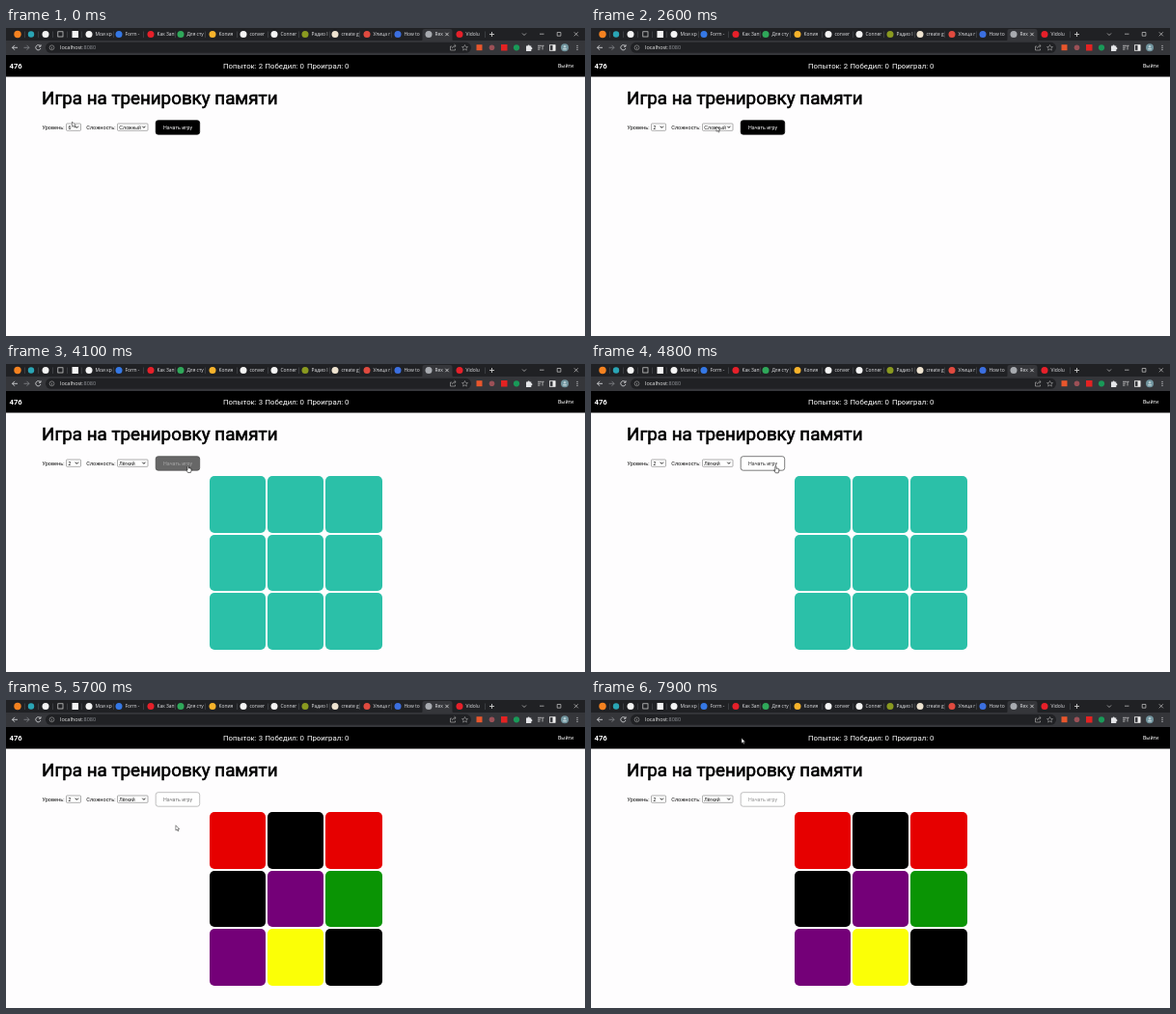
Recreate the animation shown at these times as an HTML page. Size 600 by 319 pixels, loop 8 s.

```html
<!DOCTYPE html>
<html lang="ru">
<head>
<meta charset="utf-8">
<style>
html, body { margin: 0; width: 100%; height: 100%; overflow: hidden; background: #fefdfe; }
svg { position: absolute; left: 0; top: 0; }
text { font-family: Roboto, sans-serif; white-space: pre; }
.ui { font-family: "Open Sans", sans-serif; }
.field { font-family: "Liberation Sans", Arial, sans-serif; }
.card { position: absolute; width: 58.5px; height: 58.5px; border-radius: 5px; }
</style>
</head>
<body>
<svg id="page" width="600" height="319"></svg>
<div id="grid"></div>
<svg id="top" width="600" height="319"></svg>
<script>
const $ = id => document.getElementById(id);
const rect = (x, y, w, h, fill, more = '') =>
  `<rect x="${x}" y="${y}" width="${w}" height="${h}" fill="${fill}" ${more}/>`;
const dot = (x, y, r, fill, more = '') =>
  `<circle cx="${x}" cy="${y}" r="${r}" fill="${fill}" ${more}/>`;
const label = (x, y, size, fill, str, more = '') =>
  `<text x="${x}" y="${y}" font-size="${size}" fill="${fill}" ${more}>${str}</text>`;
const line = (d, color, w = 0.8) =>
  `<path d="${d}" fill="none" stroke="${color}" stroke-width="${w}"/>`;

function tabBar() {
  let s = rect(0, 0, 600, 14, '#202124');
  s += '<path d="M429 14q2.5 0 2.5-2.5V3.5q0-2.5 2.5-2.5h26q2.5 0 2.5 2.5v8q0 2.5 2.5 2.5z" fill="#35363a"/>';
  s += dot(12, 6.5, 3.7, '#f58220') + dot(26, 6.5, 3.2, '#2aa5b5') + dot(41, 6.5, 3.5, '#f4f4f4');
  s += rect(53.8, 3.8, 5.2, 5.2, 'none', 'stroke="#ddd" stroke-width=".7"');
  s += rect(68.5, 3, 6.5, 7, '#f4f4f4');
  const tabs = [
    [86, '#f4f4f4', 'Мои кр'], [117, '#3578e5', 'Form -'], [150, '#e6202a', 'Как Зап'],
    [181, '#2fa85a', 'Для сту'], [214, '#f7b32b', 'Копия'], [246, '#f4f4f4', 'conver'],
    [278, '#f4f4f4', 'Conner'], [310, '#8a9a20', 'Радио I'], [341, '#eee3d0', 'create g'],
    [374, '#e04a3f', 'Улица r'], [406, '#3b6fe0', 'How to'], [438, '#a8abb0', 'Rex'],
    [470, '#e6202a', 'Vidolu']
  ];
  for (const [x, color, name] of tabs) {
    s += dot(x, 6.5, 3.5, color) + label(x + 6.5, 8.3, 4.9, '#e4e5e8', name, 'class="ui"');
    if (x < 400) s += rect(x + 25.5, 3.5, 0.5, 6.5, '#55585c');
  }
  for (const x of [19, 33.5, 48.5, 63.5, 78.5, 496]) s += rect(x, 3.5, 0.5, 6.5, '#55585c');
  s += line('M455.3 4.8l3.4 3.4m0-3.4l-3.4 3.4M501 6.5h5M503.5 4v5', '#ddd');
  s += line('M535 5.5l2 2 2-2M553 6.2h4.5M571.2 4.5h3.7v3.7h-3.7zM588.8 4.3l4 4m0-4l-4 4', '#ccc', 0.7);
  return s;
}

function toolBar() {
  let s = rect(0, 13, 600, 15, '#35363a');
  s += rect(41, 14.8, 441, 11, '#202124', 'rx="5.5"');
  s += line('M12 20.3H6.5M9 17.8l-2.5 2.5L9 22.8', '#e4e5e8');
  s += line('M18.5 20.3h5.5M21.5 17.8l2.5 2.5-2.5 2.5', '#84878b');
  s += line('M35.5 18.7a2.6 2.6 0 1 0 .4 2.3M36 17.2v2h-2', '#e4e5e8');
  s += dot(47.5, 20.3, 2.4, 'none', 'stroke="#aaa" stroke-width=".6"') + rect(47.2, 19.8, 0.6, 1.8, '#bbb');
  s += label(56, 22.2, 5.5, '#eee', 'localhost<tspan fill="#92959a">:8080</tspan>', 'class="ui"');
  s += line('M462 19h-1.5v4h5v-1.5M462.3 21q.5-2.5 3.5-2.5M464.5 17l1.7 1.5-1.7 1.5', '#bbb', 0.6);
  s += line('M475.5 17.5l.9 1.9 2.1.2-1.6 1.4.5 2.1-1.9-1.1-1.9 1.1.5-2.1-1.6-1.4 2.1-.2z', '#bbb', 0.5);
  s += rect(487.5, 17.2, 6, 6, '#e8562c') + dot(503.5, 20.3, 2.8, '#9b5057');
  s += rect(513, 17, 6.5, 6.5, '#e32222') + dot(529, 20.3, 3.1, '#199a58');
  s += '<path d="M539 18.5h1.5a1.1 1.1 0 0 1 2.2 0h1.6v1.6a1.1 1.1 0 0 1 0 2.2V24H539z" fill="#e4e5e8"/>';
  s += line('M551 18.3h4.5M551 20.2h3M551 22.1h2.5M556 22.5v-4.2h1.5', '#ddd', 0.7);
  s += rect(563.5, 17.7, 5.6, 5.6, 'none', 'stroke="#eee" stroke-width=".8"') + rect(566.5, 17.7, 2.6, 5.6, '#eee');
  s += dot(579, 20.3, 4, '#71959f') + dot(579, 19.3, 1.2, '#b9cdd2') + rect(577, 21, 4, 1.5, '#b9cdd2', 'rx=".7"');
  for (const y of [18.3, 20.3, 22.3]) s += dot(592, y, 0.6, '#e4e5e8');
  return s;
}

function select(id, x, w, textX) {
  const a = x + w - 5.7;
  return rect(x, 99, w, 7.3, '#fff', 'rx=".8" stroke="#777" stroke-width=".6"') +
    label(textX, 104.7, 5.2, '#111', '', `id="${id}" class="field"`) +
    line(`M${a} 101.7l1.6 1.7 1.6-1.7`, '#111', 0.9);
}

$('page').innerHTML = tabBar() + toolBar() + rect(0, 28, 600, 22.5, '#000') +
  label(3.5, 42, 7.7, '#fff', '476', 'font-weight="700"') +
  label(225, 42, 7.8, '#fff', '', 'id="tries"') +
  label(268.5, 42, 7.8, '#fff', 'Победил: 0') +
  label(311.9, 42, 7.8, '#fff', 'Проиграл: 0') +
  label(572, 41.3, 5.3, '#fff', 'Выйти') +
  label(37, 79.3, 18.8, '#000', 'Игра на тренировку памяти', 'stroke="#000" stroke-width=".6"') +
  label(37.5, 104.8, 5.5, '#111', 'Уровень:') + select('level', 62.5, 15, 64.5) +
  label(83.3, 104.8, 5.5, '#111', 'Сложность:') + select('mode', 115.5, 31.5, 117.3) +
  rect(155.2, 95.7, 45.5, 14.5, '#000', 'id="button" rx="2.5" stroke-width=".7"') +
  label(178, 104.8, 5.3, '#fff', 'Начать игру', 'id="caption" text-anchor="middle"');

$('top').innerHTML =
  '<path id="arrow" d="M0 0v5.3l1.3-1.1.9 1.9.9-.4-.9-1.8h1.7z" fill="#fff" stroke="#222" stroke-width=".5"/>' +
  '<path id="hand" d="M-.7 3.8V.5q.7-.9 1.3 0v2q1.6-.3 2.7.5v2.2L2.7 7H-.2L-2 4.3q0-1 1.3.4z" fill="#fff" stroke="#111" stroke-width=".6"/>';

const colors = ['#e60000', '#000', '#e60000', '#000', '#740078', '#0a9404', '#740078', '#fbff06', '#000'];
const cards = colors.map((color, i) => {
  const card = document.createElement('div');
  card.className = 'card';
  card.style.left = 210.5 + 60.4 * (i % 3) + 'px';
  card.style.top = 116.4 + 60.3 * Math.floor(i / 3) + 'px';
  $('grid').append(card);
  return card;
});

// Pointer path: time, x, y
const path = [
  [0, 68.5, 97], [300, 68, 98], [900, 67, 114], [1500, 66, 124.5], [2100, 66, 124.5],
  [2500, 130, 102], [2650, 130, 102], [2950, 131, 113], [3100, 131, 113], [3600, 180.5, 104.5],
  [3900, 180.5, 104.5], [4200, 191.5, 105.8], [5500, 191.5, 105.8], [6050, 140, 185],
  [6350, 128, 219], [6600, 125.5, 202], [7300, 130, 205], [7900, 156, 39.5], [8000, 156, 39.5]
];
const clamp = v => Math.max(0, Math.min(1, v));
const smooth = v => v * v * (3 - 2 * v);
const mix = (a, b, k) => {
  const v = Math.round(a + (b - a) * k);
  return `rgb(${v},${v},${v})`;
};

// CSS "ease" curve, solved by bisection
function ease(p) {
  let lo = 0, hi = 1, s = 0;
  for (let i = 0; i < 20; i++) {
    s = (lo + hi) / 2;
    const x = 0.75 * s * (1 - s) ** 2 + 0.75 * s * s * (1 - s) + s ** 3;
    if (x < p) lo = s; else hi = s;
  }
  return 0.3 * s * (1 - s) ** 2 + 3 * s * s * (1 - s) + s ** 3;
}

function pointer(t) {
  const i = path.findIndex(p => p[0] > t);
  const [t0, x0, y0] = path[i - 1], [t1, x1, y1] = path[i];
  const k = smooth((t - t0) / (t1 - t0));
  return [x0 + (x1 - x0) * k, y0 + (y1 - y0) * k];
}

function draw(t) {
  const started = t >= 4000;
  $('level').textContent = t < 2100 ? '6' : '2';
  $('mode').textContent = t < 3050 ? 'Сложный' : 'Лёгкий';
  $('tries').textContent = 'Попыток: ' + (started ? 3 : 2);

  const [x, y] = pointer(t);
  const over = x > 155 && x < 201 && y > 95 && y < 111;
  $('arrow').style.display = over ? 'none' : '';
  $('hand').style.display = over ? '' : 'none';
  $(over ? 'hand' : 'arrow').setAttribute('transform', `translate(${x} ${y})`);

  const fade = clamp((t - 4000) / 250);
  $('button').setAttribute('fill', mix(over && !started ? 26 : 0, 255, fade));
  $('button').setAttribute('stroke', started ? mix(70, 165, clamp((t - 4850) / 350)) : '#000');
  $('caption').setAttribute('fill', started
    ? mix(255 - 215 * fade, 145, clamp((t - 5500) / 300)) : '#fff');

  const angle = 180 * ease(clamp((t - 5000) / 640));
  $('grid').style.display = started ? '' : 'none';
  cards.forEach((card, i) => {
    card.style.background = angle < 90 ? '#2bc0a8' : colors[i];
    card.style.transform = angle > 0.1 && angle < 179.9
      ? `perspective(268px) rotateY(${angle}deg)` : 'none';
  });
}

const start = performance.now();
function tick() {
  draw(Math.max(0, performance.now() - start) % 8000);
  requestAnimationFrame(tick);
}
tick();
</script>
</body>
</html>
```
